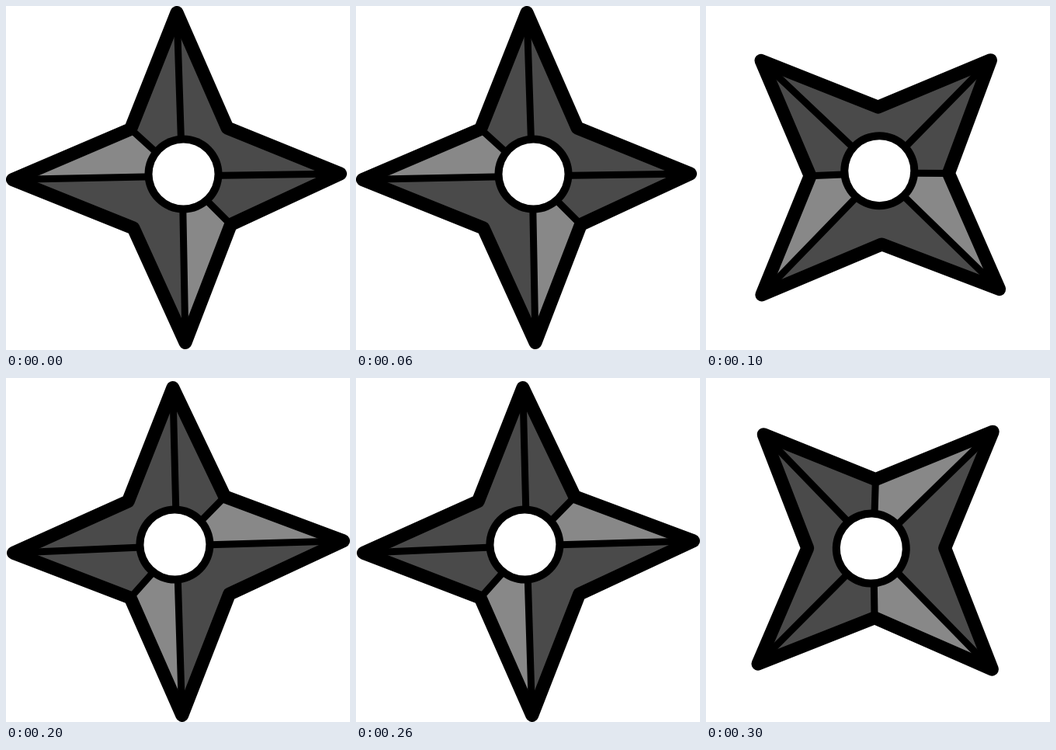
Animation, 443 px wide and 443 px high, one loop 0.4 s. Source, as an HTML page with a canvas:

```html
<!DOCTYPE html>
<html>
<head>
<meta charset="utf-8">
<title>Spinning throwing star</title>
<style>
  html, body { margin: 0; width: 100%; height: 100%; overflow: hidden; background: #fff; }
  canvas { display: block; }
</style>
</head>
<body>
<canvas id="stage" width="443" height="443"></canvas>
<script>
const ctx = document.getElementById("stage").getContext("2d");
const STEP = 100;

// One hand-drawn star around its pivot: tips and notches clockwise from the top.
const tips = [[-1, -209.5], [209.5, -2], [10, 215.5], [-212.5, 5.5]];
const notches = [[64, -61], [68.5, 63.5], [-57, 68], [-60.5, -59.5]];
const outline = tips.flatMap((tip, i) => [tip, notches[i]]);
const hub = [6, 1];
const hole = { x: 7.5, y: -1.5, radius: 40, rim: 10 };

// The star turns an eighth anticlockwise per step, with a slight wobble.
const poses = [
  { x: 221, y: 218, wobble: 0 },
  { x: 219, y: 218.5, wobble: 0.3 },
  { x: 219, y: 222, wobble: -0.6 },
  { x: 219, y: 224, wobble: 1.8 }
];

function trace(points) {
  ctx.beginPath();
  points.forEach(([x, y]) => ctx.lineTo(x, y));
  ctx.closePath();
}

function fill(points, color) {
  trace(points);
  ctx.fillStyle = color;
  ctx.fill();
}

function disc(radius, color) {
  ctx.beginPath();
  ctx.arc(hole.x, hole.y, radius, 0, 2 * Math.PI);
  ctx.fillStyle = color;
  ctx.fill();
}

function drawStar() {
  const [, rightNotch, , leftNotch] = notches;
  fill(outline, "#4a4a4a");
  fill([tips[2], rightNotch, hub], "#888");
  fill([tips[3], leftNotch, hub], "#888");

  ctx.lineJoin = "round";
  ctx.lineWidth = 9;
  ctx.beginPath();
  for (const end of [...tips, rightNotch, leftNotch]) {
    ctx.moveTo(...end);
    ctx.lineTo(...hub);
  }
  ctx.stroke();

  ctx.lineWidth = 17;
  trace(outline);
  ctx.stroke();

  disc(hole.radius + hole.rim, "#000");
  disc(hole.radius, "#fff");
}

function frame() {
  const step = Math.floor(performance.now() / STEP) % poses.length;
  const { x, y, wobble } = poses[step];
  ctx.clearRect(0, 0, 443, 443);
  ctx.save();
  ctx.translate(x, y);
  ctx.rotate((wobble - 45 * step) * Math.PI / 180);
  drawStar();
  ctx.restore();
  requestAnimationFrame(frame);
}
frame();
</script>
</body>
</html>
```
